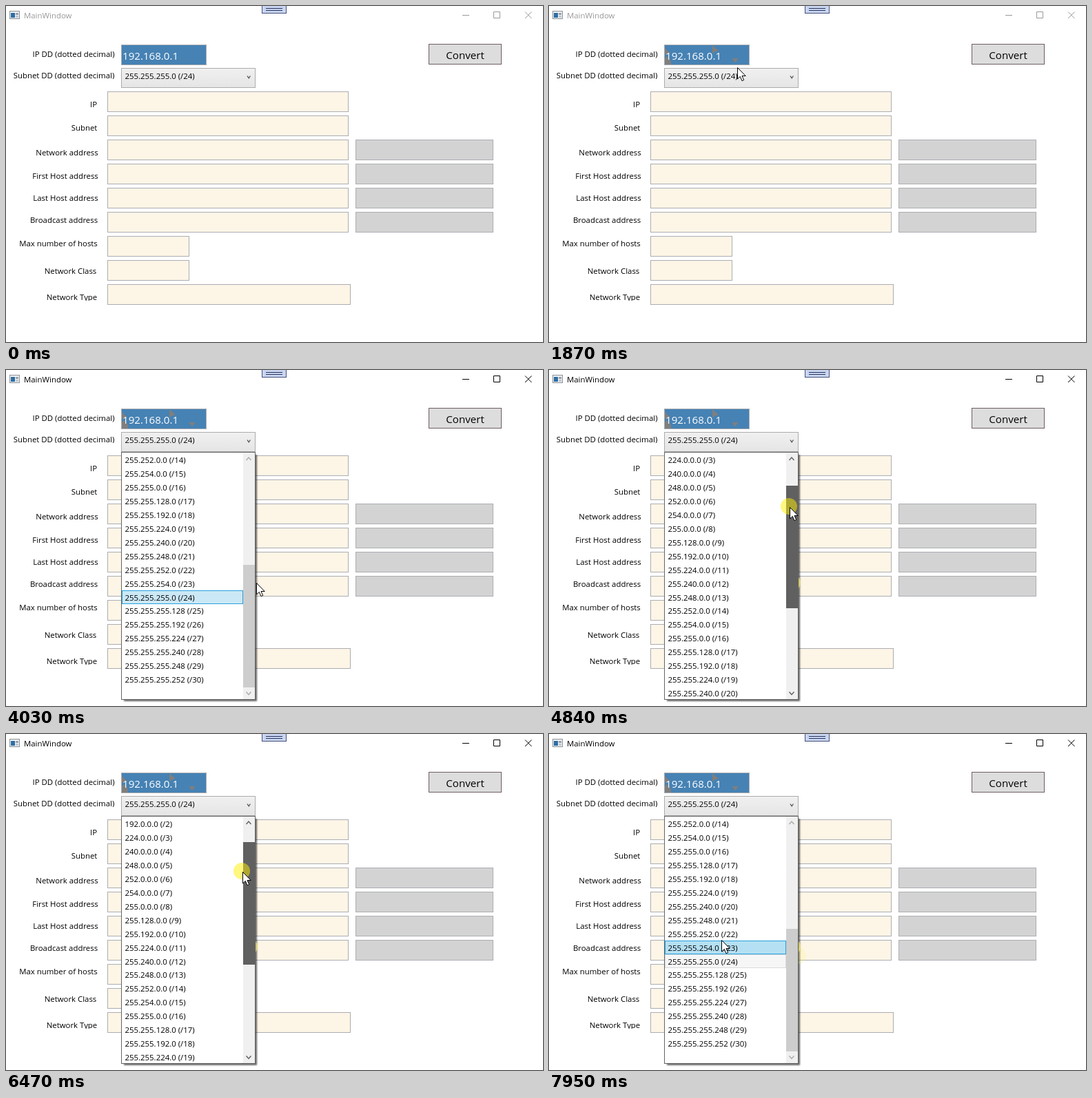
These frames come from a looping animation (779 by 488 pixels, 8000 ms). An HTML page:

```html
<!DOCTYPE html>
<html lang="en">
<head>
<meta charset="utf-8">
<title>Subnet form</title>
<style>
  html, body { margin: 0; width: 100%; height: 100%; overflow: hidden; background: #fff; }
  svg { display: block; width: 779px; height: 488px; }
  text { font: 11.4px "Open Sans", "Noto Sans", sans-serif; white-space: pre; }
  .large { font-size: 15.1px; }
</style>
</head>
<body>
<svg id="stage" viewBox="0 0 779 488"></svg>
<script>
const LOOP = 8000, FIRST_STEP = 860, STEP = 67.5;
const ROW_HEIGHT = 19.96, ROWS = 18, SELECTED = 24;
const THUMB_TOP = 137, THUMB_RANGE = 146, MAX_SCROLL = 13;

// [time, x, y] of the pointer tip
const pointerPath = [
  [860, 738, 435], [1070, 570, 310], [1330, 345, 130], [1465, 237, 56], [1600, 168, 62],
  [1670, 182, 64], [1800, 264, 75], [1870, 272, 89], [2010, 300, 98], [2210, 308, 99],
  [2890, 343, 107], [3550, 345, 118], [3800, 363, 210], [3900, 368, 260], [4030, 363, 309],
  [4290, 354, 310], [4570, 354, 310], [4840, 349, 199], [5100, 343, 164], [5320, 341, 156],
  [5390, 341, 155], [6060, 341, 155], [6470, 343, 201], [6810, 352, 262], [7020, 358, 292],
  [7290, 362, 318], [7620, 362, 323], [7820, 350, 320], [7950, 248, 299]
];
// [time, top] of the scroll thumb
const thumbPath = [
  [4570, 283], [4840, 168], [5040, 137], [6200, 137], [6470, 158],
  [6810, 218], [7020, 242], [7350, 283]
];

const box = (x, y, w, h, fill, stroke = '#abadb3', extra = '') =>
  `<rect x="${x + .5}" y="${y + .5}" width="${w - 1}" height="${h - 1}" fill="${fill}" stroke="${stroke}" ${extra}/>`;
const fillRect = (x, y, w, h, fill, extra = '') =>
  `<rect x="${x}" y="${y}" width="${w}" height="${h}" fill="${fill}" ${extra}/>`;
const label = (x, y, text, extra = '') => `<text x="${x}" y="${y}" ${extra}>${text}</text>`;
const gradient = (id, from, to) =>
  `<linearGradient id="${id}" x2="0" y2="1"><stop stop-color="${from}"/><stop offset="1" stop-color="${to}"/></linearGradient>`;

const labels = [
  [98, 74, 'IP DD (dotted decimal)'], [84, 105, 'Subnet DD (dotted decimal)'],
  [127, 147, 'IP'], [113.5, 181, 'Subnet'], [88.5, 217, 'Network address'],
  [86, 251, 'First Host address'], [86.5, 283, 'Last Host address'],
  [84, 315, 'Broadcast address'], [76, 349, 'Max number of hosts'],
  [93.5, 389, 'Network Class'], [95.5, 427, 'Network Type']
];
const fieldWidths = [350, 350, 350, 350, 350, 350, 119, 119, 353];

function subnet(bits) {
  const octets = [0, 8, 16, 24].map(start => 256 - 2 ** (8 - Math.max(0, Math.min(8, bits - start))));
  return `${octets.join('.')} (/${bits})`;
}

const rowTop = i => Math.round(120.4 + i * ROW_HEIGHT);
const rows = Array.from({ length: ROWS }, (_, i) =>
  `<g class="row">${box(168, rowTop(i), 176, 20, 'none', 'none')}${label(172.5, Math.round(134.9 + i * ROW_HEIGHT), '')}</g>`).join('');

const stage = document.getElementById('stage');
stage.innerHTML = `
<defs>
  ${gradient('idle', '#f0f0f0', '#e5e5e5')}${gradient('hover', '#ecf4fc', '#dcecfc')}
  <clipPath id="belowCombo"><rect x="160" y="119" width="220" height="369"/></clipPath>
  <clipPath id="listArea"><rect x="168" y="120" width="176" height="358"/></clipPath>
  <clipPath id="rightOfList"><rect x="362" y="119" width="20" height="360"/></clipPath>
  <filter id="soft" x="-10%" y="-10%" width="120%" height="120%"><feGaussianBlur stdDeviation="1.3"/></filter>
</defs>
${fillRect(0, 0, 779, 488, '#fff')}
${box(5, 7, 15, 12, '#eef1f4', '#8a9096')}${fillRect(7, 10, 6, 7, '#2f6ea5')}
${fillRect(14, 10, 4, 3, '#9aa3ab')}${fillRect(14, 14, 4, 3, '#c3c9ce')}
${label(26, 18, 'MainWindow', 'id="title"')}
<path id="controls" d="M662 13.5h10M707.5 8.5h9v9h-9zM753 8.5l9.5 9.5M762.5 8.5l-9.5 9.5" fill="none"/>
${box(371, -2, 36, 13, '#c9d5f0', '#46527c')}
<path d="M377 3.5h24M377 6.5h24" stroke="#27345c"/>
${labels.map(([x, y, text]) => label(x, y, text, 'text-anchor="middle"')).join('')}
${fillRect(5, 106, 156, 5, '#fff')}${fillRect(50, 428, 90, 5, '#fff')}
${fieldWidths.map((w, i) => box(147, 124 + i * 35, w, 30, '#fdf5e6')).join('')}
${[194, 229, 264, 299].map(y => box(507, y, 200, 30, '#d3d3d3')).join('')}
${box(167, 56, 124, 30, '#4682b4')}
<g fill="#7f7f7f">
  <path class="trace" data-from="1465" d="M237 57l9 8-4 1-5 3z"/>
  <path class="trace" data-from="1600" d="M168 61l8 8-8 2zM168 75l4-2 5 7v5h-9z"/>
  <path class="trace" data-from="1800" d="M265 76h10l-5 6z"/>
</g>
${label(169, 78, '192.168.0.1', 'class="large" fill="#fff"')}
${box(613, 55, 106, 30, '#ddd', '#6f5d64')}
${label(666, 77, 'Convert', 'class="large" text-anchor="middle"')}
${box(167, 90, 195, 29, 'url(#idle)', '#acacac', 'id="combo"')}
${label(172.5, 106, subnet(SELECTED))}
<path d="M350 101.5l2.2 3.3 2.2-3.3" fill="none" stroke="#505050" stroke-width="1.3"/>
<g clip-path="url(#belowCombo)"><g id="popup">
  ${fillRect(171, 123, 193, 358, '#000', 'opacity=".6" filter="url(#soft)"')}
  ${box(167, 119, 195, 360, '#fff', '#646464')}
  <g clip-path="url(#listArea)">${rows}</g>
  ${fillRect(344, 120, 17, 358, '#f0f0f0')}
  ${fillRect(344, 283, 17, 178, '#cdcdcd', 'id="thumb"')}
  <path id="arrows" d="M348.5 131l3.5-4 3.5 4M348.5 467.5l3.5 4 3.5-4" fill="none" stroke-width="1.4"/>
</g></g>
<g clip-path="url(#rightOfList)" fill="#fff36b">
  <circle class="trace" data-from="4640" cx="353" cy="309" r="12" opacity=".6"/>
  <circle class="trace" data-from="7820" cx="361" cy="322" r="12" opacity=".2"/>
</g>
<g id="pointer">
  <circle id="press" cx="-1" cy="-1" r="12" fill="#fff000" opacity=".5"/>
  <path d="M.5 .5v16.5l3.8-3.6 2.7 6.3 2.7-1.2-2.7-6h5.2z" fill="#fff" stroke="#000"/>
</g>`;

const find = id => document.getElementById(id);
const [title, controls, combo, popup, thumb, arrows, pointer, press] =
  ['title', 'controls', 'combo', 'popup', 'thumb', 'arrows', 'pointer', 'press'].map(find);
const rowNodes = [...document.querySelectorAll('.row')].map(g => ({ back: g.firstChild, text: g.lastChild }));
const traces = [...document.querySelectorAll('.trace')];

const set = (node, attrs) => Object.entries(attrs).forEach(([key, value]) => node.setAttribute(key, value));
const show = (node, visible) => set(node, { visibility: visible ? 'visible' : 'hidden' });
const within = (t, from, to) => t >= from && t < to;

function along(path, t) {
  if (t <= path[0][0]) return path[0].slice(1);
  const next = path.findIndex(point => point[0] > t);
  if (next < 0) return path[path.length - 1].slice(1);
  const a = path[next - 1], b = path[next];
  const part = (t - a[0]) / (b[0] - a[0]);
  return a.slice(1).map((value, i) => value + (b[i + 1] - value) * part);
}

function rowColors(bits, hovered) {
  if (bits === hovered) return ['#b5e0f3', '#26a0da'];
  if (bits !== SELECTED) return ['none', 'none'];
  return hovered ? ['#f6f6f6', '#dadada'] : ['#cbe8f6', '#26a0da'];
}

function drawList(t, x, y) {
  const open = t >= 3010;
  show(popup, open);
  if (!open) return;
  const slide = Math.max(0, 1 - (t - 2960) / 240) ** 2;
  set(popup, { transform: `translate(0 ${Math.round(-364 * slide)})` });

  const [top] = along(thumbPath, t);
  const scroll = Math.floor((top - THUMB_TOP) / THUMB_RANGE * MAX_SCROLL + 1e-6);
  const dragging = within(t, 4560, 7810);
  const overBar = within(x, 344, 361) && y >= 120 && t < 7810;
  set(thumb, { y: Math.round(top), fill: dragging ? '#606060' : overBar ? '#a6a6a6' : '#cdcdcd' });
  set(arrows, { stroke: dragging || overBar ? '#606060' : '#ababab' });

  const hovered = t >= 7810 && x < 344 ? scroll + 1 + Math.floor((y + 2 - 120.4) / ROW_HEIGHT) + 0 : 0;
  rowNodes.forEach(({ back, text }, i) => {
    const bits = scroll + i + 1;
    const [fill, stroke] = bits <= 30 ? rowColors(bits, hovered) : ['none', 'none'];
    set(back, { fill, stroke });
    text.textContent = bits <= 30 ? subnet(bits) : '';
  });
}

function draw(now) {
  const time = now % LOOP;
  // The screen refreshes in fixed steps
  const t = FIRST_STEP + Math.floor((time - FIRST_STEP) / STEP + .2) * STEP;
  const [x, y] = along(pointerPath, t).map(Math.round);
  const active = t >= 2680;

  set(title, { fill: active ? '#000' : '#999' });
  set(controls, { stroke: active ? '#000' : '#999' });
  const overCombo = t >= FIRST_STEP && within(x, 167, 362) && within(y, 90, 119);
  set(combo, { fill: `url(#${overCombo ? 'hover' : 'idle'})`, stroke: overCombo ? '#7eb4ea' : '#acacac' });
  drawList(t, x, y);
  traces.forEach(node => show(node, t >= node.dataset.from - 10));

  show(pointer, t >= FIRST_STEP);
  set(pointer, { transform: `translate(${x} ${y})` });
  const pressed = within(t, 2680, 2830) || within(t, 4560, 7810);
  set(press, { opacity: pressed ? .5 : 0 });
}

let start;
function tick(now) {
  start ??= now;
  draw(now - start);
  requestAnimationFrame(tick);
}
draw(0);
requestAnimationFrame(tick);
</script>
</body>
</html>
```
